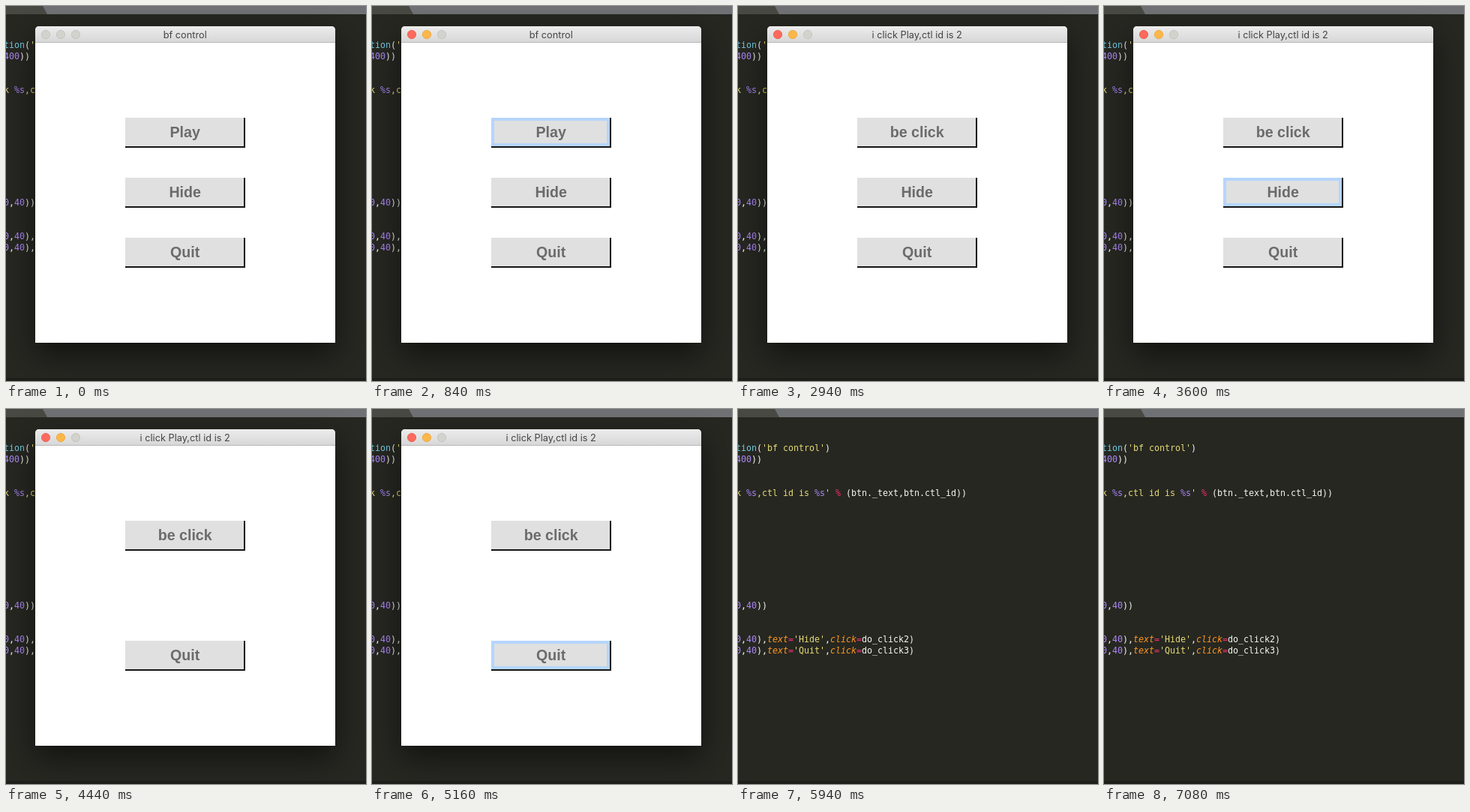
An HTML page with a canvas that plays this animation: 480 by 500 pixels, repeating every 7.14 s.

```html
<!DOCTYPE html>
<html lang="en">
<head>
<meta charset="utf-8">
<title>bf control</title>
<style>
html, body { margin: 0; width: 480px; height: 500px; overflow: hidden; background: #262721; }
canvas { display: block; }
</style>
</head>
<body>
<canvas id="stage" width="480" height="500"></canvas>
<script>
const c = document.getElementById('stage').getContext('2d');
const LOOP = 7140;
const MONO = '11.63px "DejaVu Sans Mono", monospace';
const WHITE = '#f8f8f2', YELLOW = '#e6db74', PURPLE = '#ab86f7',
      BLUE = '#70cbe2', PINK = '#f4306f', ORANGE = '#fd971f';

// Each line: baseline, then colour and text pairs
const widget = (name, handler) => [
  PURPLE, '0', WHITE, ',', PURPLE, '40', WHITE, '),', ORANGE, 'text', PINK, '=',
  YELLOW, `'${name}'`, WHITE, ',', ORANGE, 'click', PINK, '=', WHITE, handler + ')'
];
const code = [
  [56, BLUE, 'tion', WHITE, '(', YELLOW, "'bf control'", WHITE, ')'],
  [71, PURPLE, '400', WHITE, '))'],
  [116, YELLOW, 'k ', PURPLE, '%s', YELLOW, ',ctl id is ', PURPLE, '%s', YELLOW, "' ",
    PINK, '% ', WHITE, '(btn._text,btn.ctl_id))'],
  [266, PURPLE, '0', WHITE, ',', PURPLE, '40', WHITE, '))'],
  [311, ...widget('Hide', 'do_click2')],
  [326, ...widget('Quit', 'do_click3')]
];

function box(x, y, w, h, color) {
  c.fillStyle = color;
  c.fillRect(x, y, w, h);
}

function label(text, x, y, font, color) {
  c.font = font;
  c.fillStyle = color;
  c.fillText(text, x, y);
}

function drawEditor() {
  box(0, 0, 480, 500, '#262721');
  box(0, 0, 480, 11, '#707174');
  c.fillStyle = '#484943';
  c.beginPath();
  c.moveTo(0, 0);
  c.lineTo(49, 0);
  c.lineTo(55, 11);
  c.lineTo(0, 11);
  c.fill();
  box(0, 496, 480, 4, '#1e1f1a');

  c.textAlign = 'left';
  for (const [y, ...parts] of code) {
    let x = -3;
    for (let i = 0; i < parts.length; i += 2) {
      const color = parts[i], text = parts[i + 1];
      label(text, x, y, (color === ORANGE ? 'italic ' : '') + MONO, color);
      x += text.length * 7;
    }
  }
}

function drawFrame(title, active) {
  c.save();
  c.shadowColor = 'rgba(0,0,0,.55)';
  c.shadowBlur = 40;
  c.shadowOffsetY = 16;
  c.fillStyle = '#fff';
  c.beginPath();
  c.roundRect(39, 27, 400, 422, [5, 5, 0, 0]);
  c.fill();
  c.restore();

  const bar = c.createLinearGradient(0, 27, 0, 49);
  bar.addColorStop(0, '#ececec');
  bar.addColorStop(1, '#d6d6d6');
  c.fillStyle = bar;
  c.beginPath();
  c.roundRect(39, 27, 400, 22, [5, 5, 0, 0]);
  c.fill();
  box(39, 48, 400, 1, '#b8b8b8');

  const grey = ['#d3d3cd', '#bfbfba'];
  const lights = active ? [['#fc6a5d', '#e9574b'], ['#fdb748', '#e8a23a'], grey] : [grey, grey, grey];
  lights.forEach(([fill, edge], i) => {
    c.beginPath();
    c.arc(53 + i * 20, 38, 5.6, 0, Math.PI * 2);
    c.fillStyle = fill;
    c.fill();
    c.lineWidth = .8;
    c.strokeStyle = edge;
    c.stroke();
  });
  c.textAlign = 'center';
  label(title, 238.7, 43, '12.75px Inter, sans-serif', '#444');
}

function drawButton(text, y, hover, pressed) {
  box(159, y, 160, 40, '#151515');
  box(159, y, 158, 38, hover ? '#b5d5fc' : '#e0e0e0');
  if (hover) box(163, y + 4, 150, 30, pressed ? '#d2d2d2' : '#e0e0e0');
  label(text, 238.7, y + 26, 'bold 19.6px "Liberation Sans", Arial, sans-serif', '#6b6b6b');
}

function draw(now) {
  const t = now % LOOP;
  const during = (from, to) => t >= from && t < to;
  drawEditor();
  if (t < 5940) {
    const clicked = t >= 2220;
    drawFrame(clicked ? 'i click Play,ctl id is 2' : 'bf control', t >= 60);
    drawButton(clicked ? 'be click' : 'Play', 149, during(780, 2940), during(2100, 2220));
    if (t < 4320) drawButton('Hide', 229, t >= 3240, t >= 4200);
    drawButton('Quit', 309, t >= 5160, t >= 5820);
  }
}

const start = performance.now();
function tick() {
  draw(performance.now() - start);
  requestAnimationFrame(tick);
}
tick();
</script>
</body>
</html>
```
